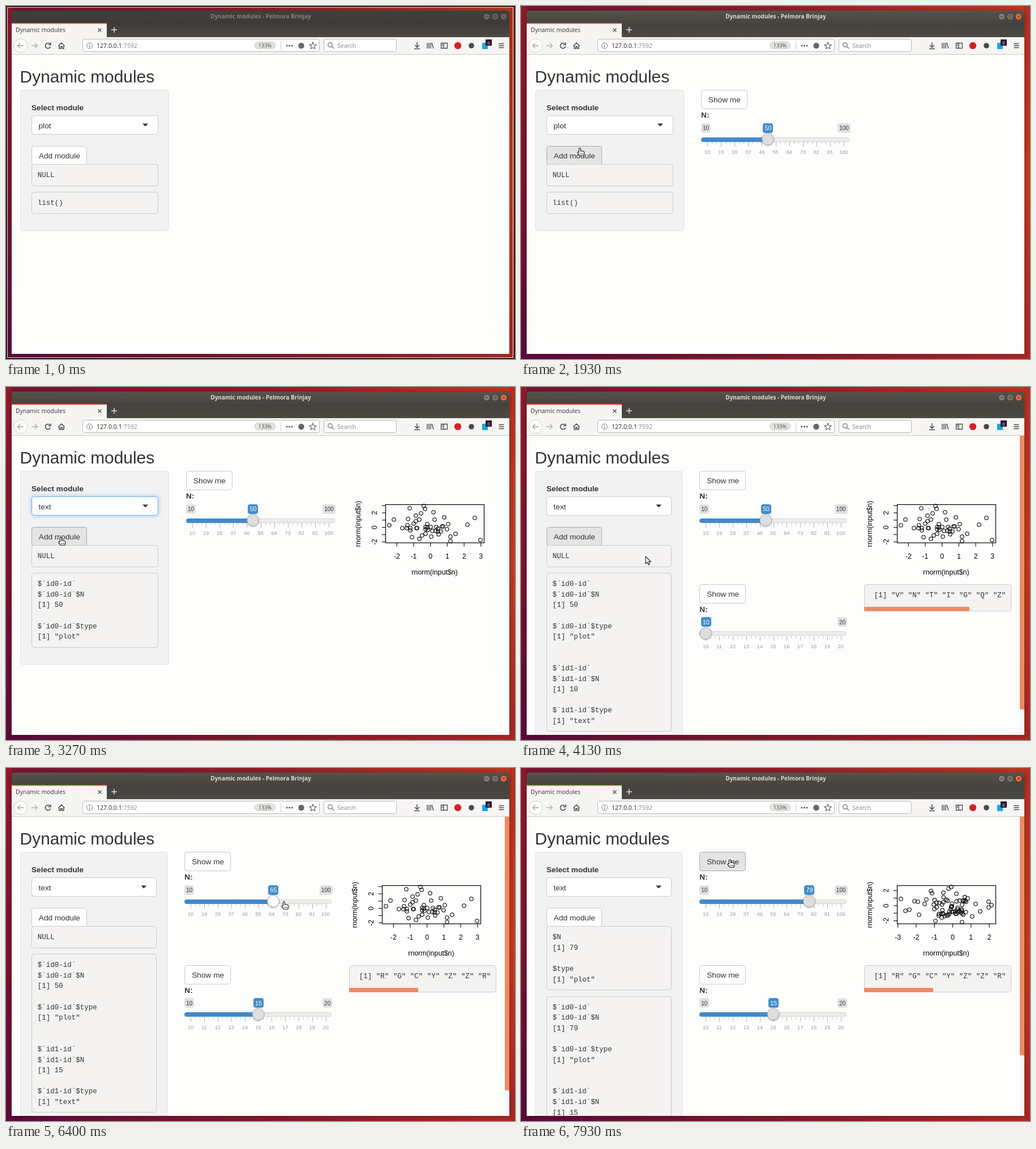
These frames come from a looping animation (899 px wide and 623 px high, 8 s). An HTML page with a canvas:

```html
<!DOCTYPE html>
<html lang="en">
<head>
<meta charset="utf-8">
<title>Dynamic modules</title>
<style>
  html, body { margin: 0; width: 100%; height: 100%; overflow: hidden; background: #7a1530; }
  canvas { display: block; }
</style>
</head>
<body>
<canvas id="stage" width="899" height="623"></canvas>
<script>
const ctx = document.getElementById('stage').getContext('2d');
const LOOP = 8000;
const SANS = '"Liberation Sans", Arial, sans-serif';
const MONO = '"Liberation Mono", monospace';
const UI = '"Open Sans", "Noto Sans", sans-serif';
const INK = '#333', BLUE = '#428bca', ORANGE = '#ee8a63', ICON = '#4a4a4a';

// Moments at which the page changes, in ms
const FOCUS = 70, MODULE_1 = 1000, OUTPUT_1 = 2070, OPEN = 2530, CHOSEN = 2930,
  PRESS = 3470, MODULE_2 = 3800, GRAB_2 = 4870, LETTERS = 5730, PLOT_2 = 6930, SHOWN = 7730;

// Each row: time, then the values reached at that time
const POINTER = [[70, 330, 420], [800, 103, 251], [1990, 103, 251], [2400, 180, 210], [2560, 180, 210],
  [2860, 80, 258], [2960, 80, 258], [3200, 96, 266], [3830, 96, 266], [4130, 220, 299], [4600, 322, 432],
  [4880, 325, 435], [5000, 341, 437], [5400, 447, 437], [5560, 447, 437], [6100, 431, 236],
  [6270, 432, 236], [6400, 490, 236], [6670, 510, 237], [6870, 510, 237], [7400, 368, 162]];
const PLOT_N = [[6270, 50], [6400, 65], [6670, 79]];
const TEXT_N = [[5000, 10], [5400, 15]];

const FIRST_POINTS = [671,244, 679,234, 694,249, 703,244, 702,249, 707,214, 704,233, 708,249, 708,253, 711,265,
  714,241, 718,227, 719,249, 720,249, 718,237, 724,234, 727,223, 724,268, 729,262, 732,210, 734,215, 735,247,
  735,251, 735,259, 738,242, 739,252, 738,248, 744,247, 745,264, 747,254, 749,221, 751,234, 754,247, 753,254,
  757,250, 757,255, 758,260, 762,255, 764,246, 766,246, 768,230, 773,251, 775,242, 779,264, 779,272, 788,259,
  809,243, 822,231, 832,270];
const OUTLIERS = [671,231, 679,252, 686,250, 695,235, 701,236, 703,259, 713,240, 716,232, 724,217, 726,221,
  732,270, 743,264, 755,213, 760,210, 746,220, 779,272, 769,222, 789,230, 797,262, 811,253, 803,240,
  826,236, 831,242, 826,246];

function cluster(count) {
  let seed = 79;
  const random = () => (seed = seed * 16807 % 2147483647) / 2147483647;
  return Array.from({ length: count }, () => [729 + 58 * random(), 227 + 36 * random()]).flat();
}
const SECOND_POINTS = OUTLIERS.concat(cluster(50));

function at(track, t) {
  const next = track.findIndex(row => row[0] > t);
  if (next === 0) return track[0].slice(1);
  if (next < 0) return track[track.length - 1].slice(1);
  const a = track[next - 1], b = track[next], k = (t - a[0]) / (b[0] - a[0]);
  return a.slice(1).map((v, i) => v + (b[i + 1] - v) * k);
}
const between = (t, a, b) => t >= a && t < b;

function text(str, x, y, size, color = INK, font = SANS, align = 'left', weight = '') {
  ctx.font = `${weight} ${size}px ${font}`;
  ctx.fillStyle = color;
  ctx.textAlign = align;
  ctx.fillText(str, x, y);
}
function rect(x, y, w, h, fill) {
  ctx.fillStyle = fill;
  ctx.fillRect(x, y, w, h);
}
function box(x, y, w, h, r, fill, stroke) {
  const left = Math.round(x) + .5, top = Math.round(y) + .5;
  ctx.beginPath();
  ctx.roundRect(left, top, Math.round(w) - 1, Math.round(h) - 1, r);
  if (fill) { ctx.fillStyle = fill; ctx.fill(); }
  if (stroke) { ctx.strokeStyle = stroke; ctx.lineWidth = 1; ctx.stroke(); }
}
function circle(x, y, r, fill, stroke, width = 1) {
  ctx.beginPath();
  ctx.arc(x, y, r, 0, 7);
  if (fill) { ctx.fillStyle = fill; ctx.fill(); }
  if (stroke) { ctx.strokeStyle = stroke; ctx.lineWidth = width; ctx.stroke(); }
}
function path(d, x, y, stroke, fill, width = 1.3) {
  ctx.save();
  ctx.translate(x, y);
  const shape = new Path2D(d);
  if (fill) { ctx.fillStyle = fill; ctx.fill(shape); }
  if (stroke) { ctx.strokeStyle = stroke; ctx.lineWidth = width; ctx.stroke(shape); }
  ctx.restore();
}
function gradient(x0, y0, x1, y1, ...colors) {
  const g = ctx.createLinearGradient(x0, y0, x1, y1);
  colors.forEach((c, i) => g.addColorStop(i / (colors.length - 1), c));
  return g;
}

function desktop(t) {
  rect(0, 0, 899, 623, gradient(0, 0, 899, 0, '#7d1230', '#971c2b', '#c2391f'));
  rect(0, 0, 10, 623, gradient(0, 0, 0, 623, '#92192b', '#7d1230', '#5d0a3c'));
  rect(0, 613, 899, 10, gradient(0, 0, 899, 0, '#5d0a3c', '#84182c', '#ab2a24'));
  rect(889, 0, 10, 623, gradient(0, 0, 0, 623, '#b5301f', '#c23c20', '#a82722'));
  if (t < FOCUS) {
    ctx.lineWidth = 1.5;
    ctx.strokeStyle = '#111';
    ctx.strokeRect(.75, .75, 897.5, 621.5);
    ctx.lineWidth = 1;
    ctx.strokeStyle = '#e8dcdc';
    ctx.strokeRect(2.5, 2.5, 893, 618);
  }
}

function browser(t) {
  const active = t >= FOCUS;
  ctx.save();
  ctx.shadowColor = 'rgba(0,0,0,.3)';
  ctx.shadowBlur = 10;
  ctx.beginPath();
  ctx.roundRect(10, 8, 879, 606, [5, 5, 0, 0]);
  ctx.fillStyle = '#4b4944';
  ctx.fill();
  ctx.restore();
  ctx.beginPath();
  ctx.roundRect(10, 8, 879, 60, [5, 5, 0, 0]);
  ctx.fillStyle = gradient(0, 8, 0, 55, ...(active ? ['#56534c', '#45433e', '#4b4944'] : ['#403f3b', '#3c3b37', '#4b4944']));
  ctx.fill();
  text('Dynamic modules - Pelmora Brinjay', 450, 22, 10, active ? '#dfdbd2' : '#85827b', UI, 'center', 'bold');
  [849, 864, 879].forEach((x, i) => {
    const hot = active && i === 2;
    circle(x, 18.7, 5.8, hot ? '#ee6a42' : active ? '#827e75' : '#6a6760', '#3a3935');
    const sign = ['M-2.5 0H2.5', 'M-2-2H2V2H-2Z', 'M-2-2L2 2M2-2L-2 2'][i];
    path(sign, x, 18.7, hot ? '#5c2414' : '#3a3935', null, 1);
  });
  rect(10, 31, 168, 24, '#f6f5f3');
  rect(10, 30, 168, 1.6, '#e8714a');
  text('Dynamic modules', 17, 46, 10.5, INK, UI);
  path('M-3-3L3 3M3-3L-3 3', 165.5, 42.5, '#444', null, 1.2);
  path('M-5 0H5M0-5V5', 191, 42, '#e6e4df', null, 1.4);

  rect(10, 55, 879, 31, '#f6f5f3');
  rect(10, 85, 879, 1, '#cbc9c2');
  circle(26, 70, 12, '#fbfbfa', '#d3d1ca');
  path('M5 0H-5M-1-4.5L-5.5 0L-1 4.5', 26, 70, '#a3a3a1');
  path('M-5 0H5M1-4.5L5.5 0L1 4.5', 50, 70, '#b0b0ae');
  path('M3.5-3A4.6 4.6 0 1 0 4.5 1.5M4.8-5.5V-1.5H.8', 74, 70, ICON, null, 1.6);
  path('M-5.5 .5L0-5L5.5 .5M-4 0V5H-1.2V1.5H1.2V5H4V0', 98, 70, ICON, null, 1.5);

  box(135, 58, 419, 23, 3, '#fefefe', '#b9b7b1');
  circle(147.5, 70, 5, null, '#777');
  path('M0-.5V3M0-3V-1.8', 147.5, 70, '#777');
  text('127.0.0.1', 160, 74, 10.6, '#222', UI);
  text(':7592', 160 + ctx.measureText('127.0.0.1').width, 74, 10.6, '#888', UI);
  box(439, 63, 37, 13, 6.5, '#e4e3e0', '#c9c8c4');
  text('133%', 457.5, 73, 9.2, '#444', UI, 'center');
  rect(485, 62, 1, 16, '#d0cfcb');
  [496, 500.5, 505].forEach(x => circle(x, 70, 1.5, '#555'));
  circle(521.5, 70, 5.2, '#666');
  path('M0-6L1.7-2L6-1.6L2.8 1.3L3.7 5.5L0 3.3L-3.7 5.5L-2.8 1.3L-6-1.6L-1.7-2Z', 542, 70, '#555', null, 1.1);
  box(561, 58, 129, 23, 3, '#fefefe', '#b9b7b1');
  circle(572.5, 68.5, 3.8, null, '#777', 1.3);
  path('M0 0L4 4', 575.3, 71.3, '#777');
  text('Search', 585, 74, 10.6, '#8a8a8a', UI);

  path('M0-6V2.5M-4-1L0 3L4-1M-5 5.5H5', 726, 70, ICON, null, 1.5);
  path('M-5-5V5M-2-5V5M1-5V5M3-5L6 5', 749, 70, ICON, null, 1.4);
  path('M-5.5-4.5H5.5V4.5H-5.5ZM-1-4.5V4.5M-4-2H-2.5M-4 0H-2.5', 774, 70, ICON);
  circle(798, 70, 6.2, '#d3222a');
  circle(822, 70, 4.8, '#4a4a4a');
  rect(841, 65, 10, 11, '#17a9e0');
  rect(847, 59, 11, 11, '#2e1436');
  text('0', 852.5, 67.5, 7.5, '#eee', UI, 'center');
  path('M-4.5-3.5H4.5M-4.5 0H4.5M-4.5 3.5H4.5', 875, 70, ICON, null, 1.5);
}

function button(label, x, y, w, pressed) {
  box(x, y, w, 33.5, 4, pressed ? '#e4e4e4' : '#fefefe', pressed ? '#a9a9a9' : '#c8c8c8');
  text(label, x + 12.8, y + 22.3, 13.7);
}

function output(lines, x, y, w) {
  const h = 20 + 18.6 * lines.length;
  box(x, y, w, h, 4, '#f4f3f2', '#c9c9cb');
  lines.forEach((line, i) => text(line, x + 10.8, y + 22.8 + 18.6 * i, 12.5, INK, MONO));
  return y + h;
}

function entry(n, type, id) {
  const prefix = id ? `$${id}$` : '$';
  return [...(id ? ['$' + id] : []), prefix + 'N', `[1] ${n}`, '', prefix + 'type', `[1] "${type}"`];
}

function sidebar(t, col) {
  const w = col - 30, inner = w - 39.5;
  const clicked = t < SHOWN ? ['NULL'] : entry(79, 'plot');
  let modules = ['list()'];
  if (t >= OUTPUT_1) modules = entry(t < PLOT_2 ? 50 : 79, 'plot', '`id0-id`');
  if (t >= MODULE_2) modules = [...modules, '', '', ...entry(t < LETTERS ? 10 : 15, 'text', '`id1-id`')];
  const top = 279.4 + 20 + 18.6 * clicked.length + 10.4;
  box(25, 148, w, top + 20 + 18.6 * modules.length + 29.5 - 148, 4, '#f3f2f2', '#dfdde3');
  text('Select module', 45, 184, 13.6, INK, SANS, 'left', 'bold');

  const open = between(t, OPEN, CHOSEN), focused = between(t, OPEN, PRESS);
  ctx.save();
  if (focused) { ctx.shadowColor = 'rgba(102,175,233,.6)'; ctx.shadowBlur = 7; }
  box(45, 193, inner, 34, 4, '#fefefe', focused ? '#74b3e6' : '#cacad2');
  ctx.restore();
  text(t < CHOSEN ? 'plot' : 'text', 57.5, 215.6, 13.7);
  path(open ? 'M-5 3H5L0-2Z' : 'M-5-2H5L0 3Z', 45 + inner - 22.5, 209.5, null, INK);

  button('Add module', 45, 246.5, 98, between(t, 760, OPEN) || between(t, 3170, GRAB_2));
  output(clicked, 45, 279.4, inner);
  output(modules, 45, top, inner);
  if (open) {
    box(45, 226, inner, 56, 3, '#fefefe', '#cfcfcf');
    const hovered = at(POINTER, t)[1] > 253 ? 1 : 0;
    rect(46, 228 + 26 * hovered, inner - 2, 26, '#f0f6fb');
    ['plot', 'text'].forEach((name, i) => text(name, 57.5, 246 + 26 * i, 13.7));
  }
}

function tag(str, x, y, size, fill, color) {
  ctx.font = `${size}px ${SANS}`;
  const w = ctx.measureText(str).width + 6;
  box(x - w / 2 + .5, y, w, 17, 3, fill, fill);
  text(str, x + .5, y + 12.8, size, color, SANS, 'center');
}

function slider(x, y, w, min, max, value, hot) {
  const from = x + 11, span = w - 22, knob = from + span * (value - min) / (max - min);
  text('N:', x, y + 49, 13.7, INK, SANS, 'left', 'bold');
  if (knob > x + 30) tag(String(min), x + 8, y + 58.5, 10, '#e1e1e1', INK);
  tag(String(max), x + w - (max > 99 ? 11 : 8.5), y + 58.5, 10, '#e1e1e1', INK);
  for (let i = 0; i <= 30; i++) {
    const major = i % 3 === 0, tx = from + span * i / 30;
    rect(Math.round(tx), y + 92, 1, major ? 8 : 4, major ? '#acb2bb' : '#c4c7cc');
    if (major) text(String(min + (max - min) * i / 30), tx, y + 113.3, 9.4, '#999', SANS, 'center');
  }
  box(x, y + 83.5, w, 8, 4, '#ecece9', '#d4d4d4');
  box(x, y + 83.5, knob - x, 8, 4, BLUE, BLUE);
  tag(String(value), knob, y + 58.5, 11, BLUE, '#fff');
  ctx.save();
  ctx.shadowColor = 'rgba(0,0,0,.35)';
  ctx.shadowBlur = 3;
  ctx.shadowOffsetY = 1;
  circle(knob, y + 87, 10.4, hot ? '#fff' : '#dedede');
  ctx.restore();
  circle(knob, y + 87, 10.4, null, '#ababab');
}

function plot(x, points, xAxis, yAxis) {
  ctx.save();
  ctx.translate(Math.ceil(x - 605.7), 0);
  ctx.strokeStyle = '#000';
  ctx.lineWidth = 1.2;
  ctx.strokeRect(664.5, 207.5, 174, 67.5);
  for (let v = xAxis.min; v <= xAxis.max; v++) {
    const px = xAxis.zero + xAxis.unit * v;
    path('M0 0V6.5', px, 275, '#000', null, 1.1);
    text(String(v), px, 302.5, 12.4, '#000', SANS, 'center');
  }
  const vertical = (str, px, py) => {
    ctx.save();
    ctx.translate(px, py);
    ctx.rotate(-Math.PI / 2);
    text(str, 0, 0, 12.4, '#000', SANS, 'center');
    ctx.restore();
  };
  for (let v = -2; v <= yAxis.max; v++) {
    const py = yAxis.zero - yAxis.unit * v;
    path('M0 0H-6.5', 664.5, py, '#000', null, 1.1);
    if (v % 2 === 0) vertical(String(v), 648.5, py);
  }
  text('rnorm(input$n)', 751, 331, 12.4, '#000', SANS, 'center');
  vertical('rnorm(input$n)', 619.5, 241.5);
  for (let i = 0; i < points.length; i += 2) circle(points[i], points[i + 1], 3.2, null, '#000', 1.1);
  ctx.restore();
}

function letters(t, x, w) {
  const early = t < LETTERS;
  box(x, 348, w, 48, 4, '#f4f3f2', '#c9c9cb');
  const sample = [...(early ? 'VNTIGQZ' : 'RGCYZZR')].map(c => `"${c}"`).join(' ');
  text(' [1] ' + sample, x + 10.6, 371, 12.5, INK, MONO);
  rect(Math.round(x), 388, early ? 186 : 122, 7.5, ORANGE);
}

function modules(t, col) {
  const left = 25 + col, right = 25 + 2 * col, w = col - 30;
  if (t >= MODULE_1) {
    button('Show me', left, 148, 82, t >= 7360);
    slider(left, 148, w, 10, 100, Math.round(at(PLOT_N, t)[0]), between(t, 6080, 6720));
  }
  if (t >= PLOT_2) {
    plot(right, SECOND_POINTS, { min: -3, max: 2, zero: 762.5, unit: 32.3 }, { max: 2, zero: 243, unit: 13.3 });
  } else if (t >= OUTPUT_1) {
    plot(right, FIRST_POINTS, { min: -2, max: 3, zero: 743.7, unit: 29.7 }, { max: 3, zero: 247.7, unit: 12.8 });
  }
  if (t >= MODULE_2) {
    button('Show me', left, 347.7, 82, false);
    slider(left, 347.7, w, 10, 20, Math.round(at(TEXT_N, t)[0]), between(t, 4600, 5560));
    letters(t, right, w);
  }
}

function pointer(t) {
  if (t < FOCUS) return;
  const [x, y] = at(POINTER, t);
  const hand = between(t, 760, 3880) || between(t, 5040, 5570) || between(t, 6060, 6900) || t >= 7340;
  if (hand) {
    path('M-1.5 7V1Q-1.5-.5 0-.5Q1.5-.5 1.5 1V4.5Q3 3.6 4 5Q5.5 4.2 6.2 5.5Q8 5.2 8 7.4V9.4Q8 11.2 6.9 13H-.3Q-1.3 10.8-3.6 8.7Q-4.5 7.4-3.4 6.6Q-2.4 6.2-1.5 7Z', x + .8, y + .3, '#111', '#fff', 1.1);
    path('M1.4 8.6V11M3.5 8.6V11M5.6 8.6V11', x + .8, y + .3, '#111', null, .8);
  } else {
    path('M0 0V12.5L3 9.8L5 14.5L7.2 13.5L5.2 9H9Z', x, y, '#111', '#fff', 1.1);
  }
}

function draw(t) {
  const scrolls = t >= MODULE_2, col = (scrolls ? 871 : 879) / 3;
  desktop(t);
  browser(t);
  ctx.save();
  ctx.beginPath();
  ctx.rect(10, 86, 879, 528);
  ctx.clip();
  rect(10, 86, 879, 528, '#fdfdfc');
  text('Dynamic modules', 24.6, 135.3, 29.9);
  sidebar(t, col);
  modules(t, col);
  if (scrolls) {
    rect(881, 86, 8, 528, '#f8f7f6');
    rect(881, 86, 8, t < SHOWN ? 483 : 421, ORANGE);
  }
  ctx.restore();
  pointer(t);
}

function tick() {
  draw(performance.now() % LOOP);
  requestAnimationFrame(tick);
}
tick();
</script>
</body>
</html>
```
